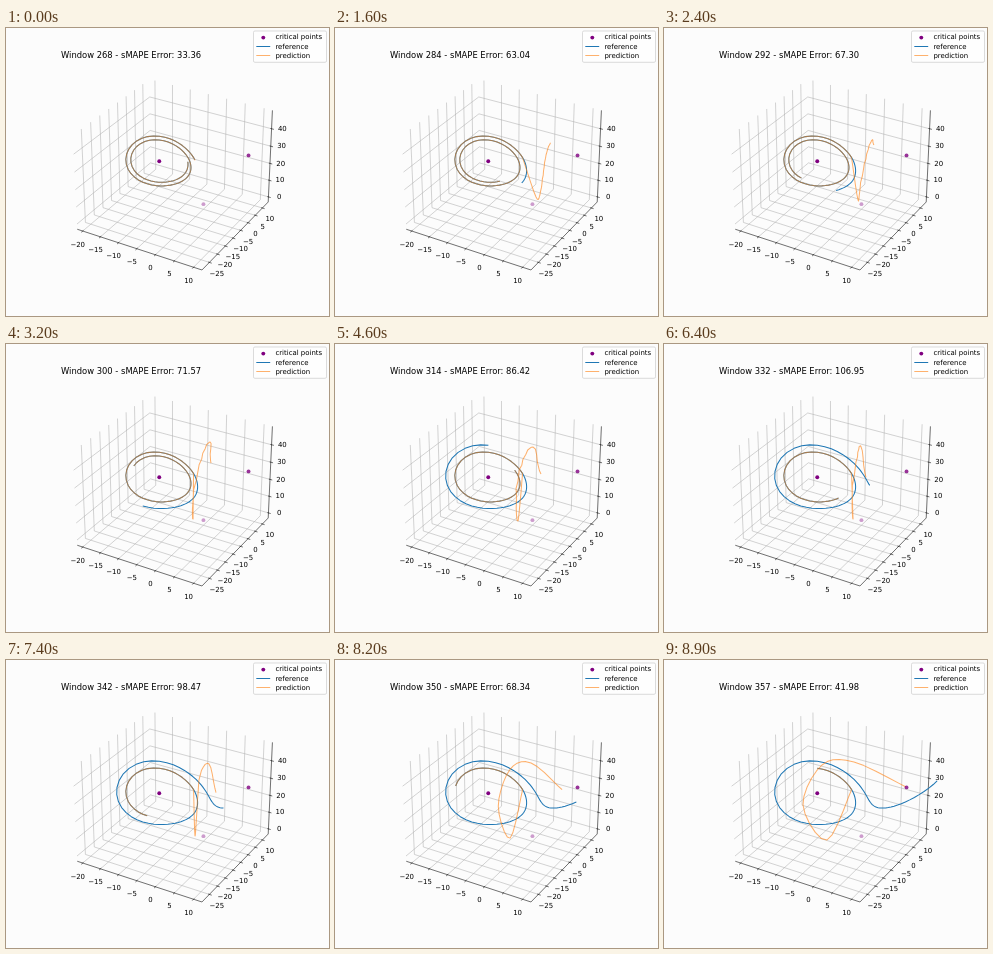
An HTML page that plays this animation: 323 px wide and 288 px high, repeating every 9 s.

```html
<!DOCTYPE html>
<html lang="en">
<head>
<meta charset="utf-8">
<title>Window forecast</title>
<style>
  html, body { margin: 0; width: 100%; height: 100%; overflow: hidden; background: #fcfcfc; }
  svg { display: block; width: 323px; height: 288px; }
  text { font: 6.94px "DejaVu Sans", sans-serif; fill: #000; }
  .mid { text-anchor: middle; }
  #title { font-size: 8.39px; }
  path { fill: none; stroke-linejoin: round; }
  .grid { stroke: #b0b0b0; stroke-width: .56; }
  .axis { stroke: #000; stroke-width: .56; }
  .ref { stroke: #1f77b4; stroke-width: 1.04; }
  .pred { stroke: #ff7f0e; stroke-opacity: .6; stroke-width: 1.04; }
  .dot { fill: #800080; }
</style>
</head>
<body>
<svg viewBox="0 0 323 288">
  <path class="grid" id="grid"/>
  <path class="axis" id="axis"/>
  <g id="labels"></g>
  <path class="ref" id="ref"/>
  <path class="pred" id="pred"/>
  <g class="dot" id="critical"></g>
  <text id="title" x="55" y="30"></text>
  <rect x="247.5" y="3" width="73" height="31.3" rx="1.4" fill="#fff" fill-opacity=".8" stroke="#ccc" stroke-width=".7"/>
  <circle class="dot" cx="257.3" cy="9.6" r="1.95"/>
  <path class="ref" d="M250.3 18.5H264.2"/>
  <path class="pred" d="M250.3 27.5H264.2"/>
  <text x="269.4" y="11.4">critical points</text>
  <text x="269.4" y="20.7">reference</text>
  <text x="269.4" y="30.1">prediction</text>
</svg>
<script>
const $ = id => document.getElementById(id);
const FRAMES = 90, STEP = 100, SPAN = 100, SPLIT = 99;

const mix = (a, b, k) => a + (b - a) * k;
const mixPoint = (p, q, k) => p.map((v, i) => mix(v, q[i], k));
const toPath = pts => "M" + pts.map(p => p[0].toFixed(2) + " " + p[1].toFixed(2)).join("L");

// Perspective view of the unit box: elevation 30, azimuth -60 degrees
function project([fx, fy, fz]) {
  const x = (fx - .5) * 1.1905, y = (fy - .5) * 1.1905, z = (fz - .5) * .8929;
  const depth = 10 - (.433 * x - .75 * y + .5 * z);
  return [168.5 + 1200 * (.866 * x + .5 * y) / depth,
          142 - 1200 * (-.25 * x + .433 * y + .866 * z) / depth];
}

// Each axis: tick values, box fraction of the first tick and per unit, label offset
const axes = [
  { first: -20, last: 10, gap: 5, from: .046, unit: .02966, shift: [-5, 13],
    wall: f => [[f, 0, 0], [f, 1, 0], [f, 1, 1]], tick: (f, e) => [f, -e, 0] },
  { first: -25, last: 10, gap: 5, from: .103, unit: .0229, shift: [7.5, 10.8],
    wall: f => [[1, f, 0], [0, f, 0], [0, f, 1]], tick: (f, e) => [1 + e, f, 0] },
  { first: 0, last: 40, gap: 10, from: .058, unit: .0187, shift: [10.8, -.3],
    wall: f => [[0, 0, f], [0, 1, f], [1, 1, f]], tick: (f, e) => [1 + e, 1, f] }
];
const fraction = (axis, value) => axis.from + (value - axis.first) * axis.unit;
const toScreen = state => project(state.map((v, i) => fraction(axes[i], v)));

function drawAxes() {
  const line = pts => toPath(pts.map(project));
  let grid = "", axis = line([[0, 0, 0], [1, 0, 0], [1, 1, 0], [1, 1, 1]]), labels = "";
  for (const a of axes) {
    for (let value = a.first; value <= a.last; value += a.gap) {
      const f = fraction(a, value), [x, y] = project(a.tick(f, 0));
      grid += line(a.wall(f));
      axis += line([a.tick(f, -.009), a.tick(f, .018)]);
      labels += `<text class="mid" x="${x + a.shift[0]}" y="${y + a.shift[1] + 2.5}">${String(value).replace("-", "\u2212")}</text>`;
    }
  }
  $("grid").setAttribute("d", grid);
  $("axis").setAttribute("d", axis);
  $("labels").innerHTML = labels;
}

// Lorenz system
const SIGMA = 10, RHO = 28, BETA = 8 / 3, DT = .014;
const flow = ([x, y, z]) => [SIGMA * (y - x), x * (RHO - z) - y, x * y - BETA * z];

function advance(s) {
  const move = (k, h) => s.map((v, i) => v + k[i] * h);
  const a = flow(s), b = flow(move(a, DT / 2)), c = flow(move(b, DT / 2)), d = flow(move(c, DT));
  return s.map((v, i) => v + DT / 6 * (a[i] + 2 * b[i] + 2 * c[i] + d[i]));
}

function orbit(offset, steps) {
  const states = [[-2.5 + offset, -1.7 + offset, 25.1]];
  while (states.length <= steps) states.push(advance(states[states.length - 1]));
  return states;
}

// Shoot for the orbit that leaves the saddle to the left, at x = -1.8 on step 116
function aim() {
  let low = -1, high = 1;
  for (let i = 0; i < 60; i++) {
    const mid = (low + high) / 2;
    if (orbit(mid, 116)[116][0] > -1.8) high = mid; else low = mid;
  }
  return low;
}
const trajectory = orbit(aim(), FRAMES + SPAN).map(toScreen);

function drawCriticalPoints() {
  const c = Math.sqrt(BETA * (RHO - 1));
  const points = [[[-c, -c, RHO - 1], 1], [[c, c, RHO - 1], .8], [[0, 0, 0], .38]];
  $("critical").innerHTML = points.map(([state, alpha]) => {
    const [x, y] = toScreen(state);
    return `<circle cx="${x}" cy="${y}" r="1.95" opacity="${alpha}"/>`;
  }).join("");
}

// Forecast poses: window offset, error, key points past the split
const poses = [
  { at: 0, error: 33.36, pts: Array(5).fill(trajectory[SPAN]) },
  { at: 16, error: 63.04, pts: [[201, 169], [205, 166], [208, 147], [211, 127], [215.5, 115]] },
  { at: 32, error: 71.57, pts: [[187, 175], [187, 152], [195, 115], [204, 98], [205, 120]] },
  { at: 46, error: 86.42, pts: [[183, 177], [181, 150], [186, 121], [198, 103], [206, 131]] },
  { at: 64, error: 106.95, pts: [[189, 175], [188, 148], [193, 113], [197, 103], [202, 134]] },
  { at: 74, error: 98.47, pts: [[189, 176], [191, 148], [194, 115], [203, 104], [210, 133]] },
  { at: 89, error: 41.98, pts: [[163, 180], [139, 145], [158, 105], [190, 102], [242, 127]] }
];

// Catmull-Rom curve through the points
function smooth(pts, per) {
  const at = i => pts[Math.max(0, Math.min(i, pts.length - 1))], out = [];
  for (let k = 0; k <= (pts.length - 1) * per; k++) {
    const i = Math.floor(k / per), t = k / per - i;
    out.push([0, 1].map(c => {
      const [a, b, d, e] = [-1, 0, 1, 2].map(j => at(i + j)[c]);
      return b + t / 2 * (d - a + t * (2 * a - 5 * b + 4 * d - e + t * (3 * (b - d) + e - a)));
    }));
  }
  return out;
}

// Repeatable noise in -1..1
function noise(seed) {
  const v = Math.sin(seed * 12.9898) * 43758.5453;
  return 2 * (v - Math.floor(v)) - 1;
}

function render(n) {
  const i = Math.max(0, poses.findIndex(p => p.at > n) - 1);
  const a = n < FRAMES - 1 ? poses[i] : poses[poses.length - 2], b = poses[poses.indexOf(a) + 1];
  const k = (n - a.at) / (b.at - a.at);
  const keys = [trajectory[SPLIT], ...a.pts.map((p, j) => mixPoint(p, b.pts[j], k))];
  const rough = 1.6 * Math.sin(Math.PI * n / (FRAMES - 1)) ** 2;
  const tail = smooth(keys, 5).map(([x, y], j) => [x + rough * j / 25 * noise(j + 1), y + rough * j / 25 * noise(j + 51)]);
  $("ref").setAttribute("d", toPath(trajectory.slice(n, n + SPAN + 1)));
  $("pred").setAttribute("d", toPath(trajectory.slice(n, SPLIT).concat(tail)));
  $("title").textContent = `Window ${268 + n} - sMAPE Error: ${mix(a.error, b.error, k).toFixed(2)}`;
}

let shown = -1;
const start = performance.now();
function loop() {
  const n = Math.floor((performance.now() - start) / STEP) % FRAMES;
  if (n !== shown) render(shown = n);
  requestAnimationFrame(loop);
}

drawAxes();
drawCriticalPoints();
loop();
</script>
</body>
</html>
```
